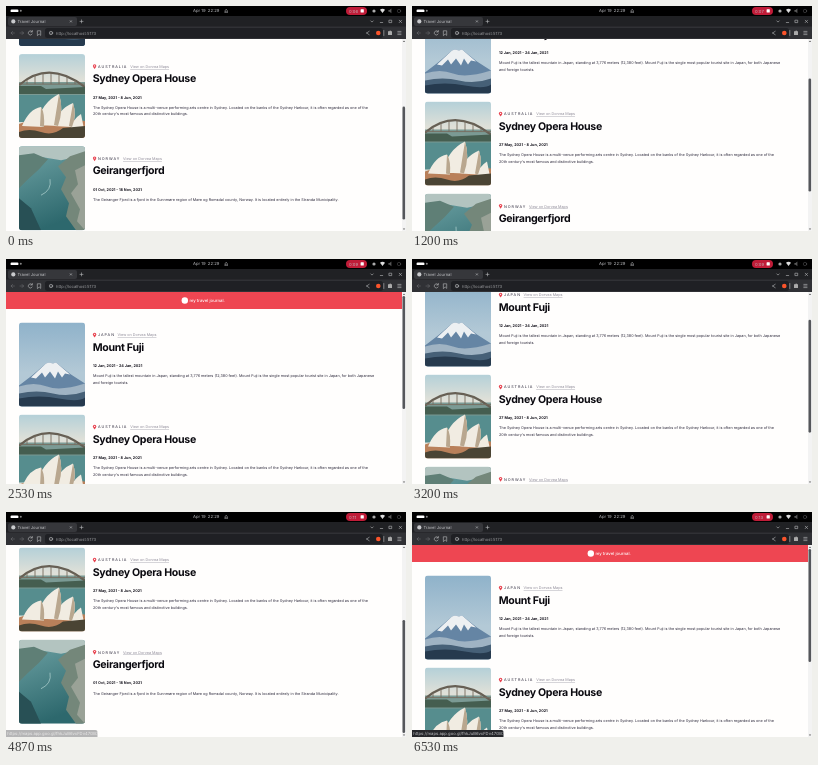
Recreate the animation shown at these times as an HTML page. Size 400x225 px, loop 7 s.

```html
<!DOCTYPE html>
<html lang="en">
<head>
<meta charset="utf-8">
<title>Travel Journal</title>
<style>
  html, body { margin: 0; width: 100%; height: 100%; overflow: hidden; background: #000; }
  svg { display: block; width: 100%; height: 100%; font-family: Inter, sans-serif; text-rendering: geometricPrecision; }
  .ui { font-size: 4.2px; fill: #c4c5c8; }
  .line { fill: none; stroke: #b9babd; stroke-width: .6; stroke-linecap: round; }
  .dim { opacity: .4; }
  .country { font-size: 3.75px; letter-spacing: .95px; fill: #2b283a; }
  .link { font-size: 3.75px; fill: #918e9b; text-decoration: underline; }
  .title { font-size: 10.6px; font-weight: 700; letter-spacing: -.3px; fill: #0b0a10; }
  .date { font-size: 3.75px; font-weight: 700; fill: #15131d; }
  .desc { font-size: 3.75px; fill: #2b283a; }
</style>
</head>
<body>
<svg viewBox="0 0 400 225">
  <defs>
    <clipPath id="view"><rect y="33" width="400" height="192"/></clipPath>
    <clipPath id="photo"><rect width="66" height="84" rx="3"/></clipPath>
    <linearGradient id="sky" x2="0" y2="1"><stop stop-color="#8fb2ca"/><stop offset=".6" stop-color="#b3c9d6"/></linearGradient>
    <linearGradient id="haze" x2="0" y2="1"><stop stop-color="#b4d0d8"/><stop offset=".3" stop-color="#dfe0d8"/></linearGradient>
    <linearGradient id="fjord" x2=".3" y2="1"><stop stop-color="#6fa3a5"/><stop offset="1" stop-color="#2d686d"/></linearGradient>

    <g id="fuji">
      <rect width="66" height="84" fill="url(#sky)"/>
      <path d="M0 63 13 53 27 41 30 40 34 41 37 40 52 52 66 61V84H0Z" fill="#6585a4"/>
      <path d="M12 55 27 41 30 40 34 41 37 40 51 52 46 51 43 55 39 49 36 56 31 49 26 55 23 50 17 56Z" fill="#edf0f2"/>
      <path d="M0 64Q15 59 28 64T66 61V74H0Z" fill="#9fb3c3"/>
      <path d="M0 71Q18 67 34 71T66 69V84H0Z" fill="#466077"/>
      <path d="M0 76Q20 72 40 76T66 75V84H0Z" fill="#263a4e"/>
    </g>
    <g id="opera">
      <rect width="66" height="84" fill="url(#haze)"/>
      <path d="M0 28H66V44H0Z" fill="#7b9a94"/>
      <path d="M0 31Q30 5 66 33" fill="none" stroke="#665f54" stroke-width="2.2"/>
      <path d="M0 30H66M8 26V30M16 21V30M24 19V30M32 19V30M40 20V30M48 22V30M56 26V30" stroke="#776c5e" stroke-width=".9"/>
      <path d="M0 32H22L27 35 66 33V40H0Z" fill="#455e50"/>
      <path d="M0 41H66V68H0Z" fill="#568d8e"/>
      <path d="M0 70 20 63 66 67V84H0Z" fill="#b9805a"/>
      <path d="M3 72Q10 55 22 53 26 59 25 73ZM17 71Q23 48 40 40 45 55 39 72ZM35 72Q39 55 54 49 58 61 53 73ZM52 74Q54 65 62 60L65 75Z" fill="#f1ece2"/>
      <path d="M22 53Q26 59 25 73L21 72ZM40 40Q45 55 39 72L35 71ZM54 49Q58 61 53 73L50 72Z" fill="#b9a78f"/>
      <path d="M0 78Q10 74 22 78T44 74L66 72V84H0Z" fill="#4a4434"/>
    </g>
    <g id="geiranger">
      <rect width="66" height="84" fill="url(#fjord)"/>
      <path d="M0 0H66V9L42 14 24 11 0 17Z" fill="#b3c4c0"/>
      <path d="M0 9 15 7 29 13 20 23 8 34 0 42Z" fill="#5f7f76"/>
      <path d="M66 5 51 10 39 20 47 31 42 43 50 57 47 70 57 84H66Z" fill="#74877a"/>
      <path d="M66 19 56 24 59 38 52 47 61 63 58 75 66 84Z" fill="#9aa297"/>
      <path d="M0 52 12 62 22 84H0Z" fill="#285055"/>
      <path d="M22 49Q33 44 31 33" fill="none" stroke="#a8cbc9" stroke-width=".8"/>
    </g>
  </defs>

  <rect width="400" height="10" fill="#000"/>
  <rect x="4.5" y="3.6" width="8" height="2.5" rx="1.2" fill="#fff"/>
  <circle cx="14.8" cy="4.8" r="1" fill="#888"/>
  <text class="ui" x="187" y="6.4">Apr 19&#160; 22:29</text>
  <path class="line" d="M218.8 6.2H221.6M219.2 6V4.5Q220.2 2 221.2 4.5V6"/>
  <rect x="340" y="1" width="21" height="8" rx="4" fill="#c01c38"/>
  <text class="ui" id="timer" x="343" y="6.5" opacity=".9"/>
  <rect x="354.6" y="3.3" width="3.2" height="3.2" rx=".5" fill="#fff"/>
  <circle cx="368" cy="5" r="1.6" fill="#aaa"/>
  <path d="M374 3.8Q376.5 1.8 379 3.8L376.5 7Z" fill="#ddd"/>
  <path class="dim" d="M382.4 4.1H383.6L385.4 2.6V7.2L383.6 5.8H382.4Z" fill="#ddd"/>
  <circle class="line dim" cx="393" cy="5" r="1.7"/>

  <rect y="10" width="400" height="11" fill="#202124"/>
  <rect x="2" y="11" width="69" height="9" rx="2" fill="#36373b"/>
  <circle cx="7.3" cy="15.4" r="2.1" fill="#c9cacd"/>
  <text class="ui" x="11.4" y="17">Travel Journal</text>
  <path class="line" d="M64.2 14.7 65.6 16.1M65.6 14.7 64.2 16.1M74 15.4H77M75.5 13.9V16.9M364.8 14.9 366 16.1 367.2 14.9M374.3 16.5H376.7M383.3 14.2H385.7V16.6H383.3ZM393.2 14.2 395.6 16.6M395.6 14.2 393.2 16.6"/>

  <rect y="20.5" width="400" height="12.5" fill="#303135"/>
  <rect x="39" y="22" width="338" height="10" rx="2.5" fill="#1f2024"/>
  <path class="line" d="M26 25.6A2.1 2.1 0 1 0 26.2 28M26.3 24.4V26H24.7M31.7 24.8H34.7V29.4L33.2 28 31.7 29.4Z"/>
  <path class="line" d="M360.6 27 363.2 25.3M360.6 27 363.2 28.7M377.8 24.5V29.5"/>
  <path class="line dim" d="M8.4 27H5.2M6.6 25.4 5 27 6.6 28.6M14 27H17.4M16 25.4 17.6 27 16 28.6"/>
  <circle class="line" cx="45" cy="27" r="1.7"/>
  <path class="line" d="M45 26.8V27.8"/>
  <text class="ui" x="50" y="28.6" opacity=".75">http://localhost:5173</text>
  <circle cx="372.3" cy="27" r="2.3" fill="#fb542b"/>
  <path d="M382 25.3H383.4A.8.8 0 0 1 385 25.3H386V29H382Z" fill="#aaa"/>
  <path class="line" d="M391.8 25.4H395M391.8 27H395M391.8 28.6H395"/>

  <g clip-path="url(#view)">
    <rect y="33" width="400" height="192" fill="#fffefd"/>
    <g id="page">
      <rect y="33" width="396" height="17" fill="#ee4652"/>
      <circle cx="178.8" cy="41.5" r="3.2" fill="#fff"/>
      <text x="183.5" y="42.9" font-size="4.3" font-weight="500" fill="#fff">my travel journal.</text>
    </g>
    <rect x="396" y="33" width="4" height="192" fill="#f3f3f3"/>
    <path d="M396.8 36 398 34.4 399.2 36ZM396.8 222.4 398 224 399.2 222.4Z" fill="#666"/>
    <rect id="thumb" x="396.5" width="2.6" height="113" rx="1.3" fill="#55575b"/>
  </g>

  <g id="status">
    <path d="M0 218H89.5Q91.5 218 91.5 220V225H0Z" fill="#25262a"/>
    <text class="ui" x="1.2" y="223.1">https://maps.app.goo.gl/fhkJuB6vxFDv47GB7</text>
  </g>
</svg>
<script>
  const LOOP = 7000, FPS = 15, MAX_SCROLL = 120;
  const byId = id => document.getElementById(id);

  const places = [
    { photo: 'fuji', country: 'JAPAN', linkX: 111.6, title: 'Mount Fuji', date: '12 Jan, 2021 - 24 Jan, 2021',
      text: ['Mount Fuji is the tallest mountain in Japan, standing at 3,776 meters (12,380 feet). Mount Fuji is the single most popular tourist site in Japan, for both Japanese',
        'and foreign tourists.'] },
    { photo: 'opera', country: 'AUSTRALIA', linkX: 124.2, title: 'Sydney Opera House', date: '27 May, 2021 - 8 Jun, 2021',
      text: ['The Sydney Opera House is a multi-venue performing arts centre in Sydney. Located on the banks of the Sydney Harbour, it is often regarded as one of the',
        '20th century\'s most famous and distinctive buildings.'] },
    { photo: 'geiranger', country: 'NORWAY', linkX: 117, title: 'Geirangerfjord', date: '01 Oct, 2021 - 18 Nov, 2021',
      text: ['The Geiranger Fjord is a fjord in the Sunnmøre region of Møre og Romsdal county, Norway. It is located entirely in the Stranda Municipality.'] }
  ];

  const label = (cls, x, y, s) => `<text class="${cls}" x="${x}" y="${y}">${s}</text>`;

  const card = (p, i) => `<g transform="translate(0 ${63.5 + i * 92.1})">
    <g transform="translate(13 0)" clip-path="url(#photo)"><use href="#${p.photo}"/></g>
    <path d="M88.6 15Q86.9 12.7 86.9 11.9A1.7 1.7 0 0 1 90.3 11.9Q90.3 12.7 88.6 15Z" fill="#e8424f"/>
    <circle cx="88.6" cy="11.8" r=".6" fill="#fff"/>
    ${label('country', 92, 13.9, p.country)}
    ${label('link', p.linkX, 13.9, 'View on Dorvea Maps')}
    ${label('title', 86.7, 28, p.title)}
    ${label('date', 87, 44.8, p.date)}
    ${p.text.map((s, n) => label('desc', 87, 54.9 + n * 6.2, s)).join('')}
  </g>`;
  byId('page').insertAdjacentHTML('beforeend', places.map(card).join(''));

  // [tick, scroll offset] at 15 ticks per second
  const scrollKeys = [[0, 107.5], [7, 107.5], [18, 60], [29, 17.5], [33, 0], [45, 0], [54, MAX_SCROLL],
    [82, MAX_SCROLL], [85, 67.5], [89, 10], [90, 10], [94, 0], [105, 0]];

  function scrollAt(tick) {
    const i = scrollKeys.findIndex(k => k[0] > tick);
    const [t0, a] = scrollKeys[i - 1], [t1, b] = scrollKeys[i];
    return a + (b - a) * (tick - t0) / (t1 - t0);
  }

  function draw(ms) {
    const tick = Math.min(104, Math.floor((ms + 4) * FPS / 1000));
    const scroll = scrollAt(tick);
    byId('page').setAttribute('transform', `translate(0 ${-scroll})`);
    byId('thumb').setAttribute('y', 37 + scroll / MAX_SCROLL * 71);
    byId('status').setAttribute('opacity', Math.max(0, Math.min(1, (tick - 72) / 3)));
    const secs = 6 + Math.floor((tick + 7) / FPS);
    byId('timer').textContent = '0:' + String(secs).padStart(2, '0');
  }

  function loop() {
    draw(performance.now() % LOOP);
    requestAnimationFrame(loop);
  }
  loop();
</script>
</body>
</html>
```
